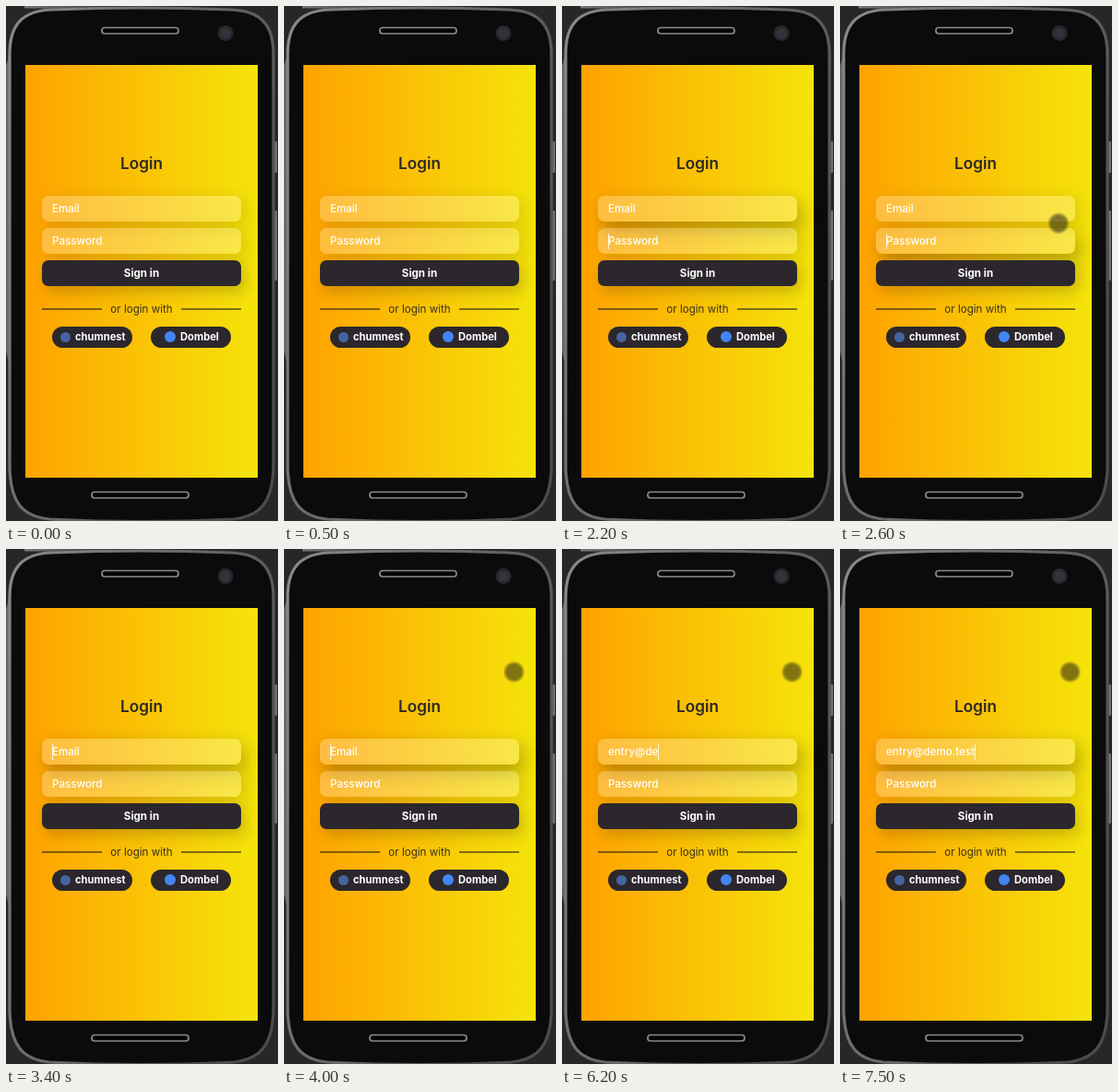
Write an HTML page that moves like this. It is 295 px wide and 559 px high and loops after 8 s.

```html
<!DOCTYPE html>
<html lang="en">
<head>
<meta charset="utf-8">
<title>Login screen</title>
<style>
  html, body { margin: 0; width: 100%; height: 100%; overflow: hidden; background: #272729; }
  #stage { position: relative; width: 295px; height: 559px; overflow: hidden;
    font: 500 11.6px/28px Inter, "Open Sans", sans-serif; color: #fff; white-space: pre; }
  #stage > * { position: absolute; }
  #phone { left: 0; top: 0; }
  #screen { left: 21px; top: 64px; width: 252px; height: 448px;
    background: linear-gradient(90deg, #ffa200, #f5e40a); }
  h1 { margin: 0; left: 21px; width: 252px; top: 157px; text-align: center;
    font-size: 17.2px; font-weight: 600; color: #2b272b; }
  .field, #submit { left: 39px; width: 216px; height: 28px; border-radius: 7px; }
  .field { box-sizing: border-box; padding-left: 11px; background: rgba(255,255,255,.25); }
  .hint { position: absolute; left: 11px; top: 0; }
  .caret { display: inline-block; width: 1px; height: 17px; background: #fffc; vertical-align: middle; }
  #email { top: 206px; }
  #password { top: 241px; }
  #submit { top: 275.5px; background: #2b272d; text-align: center; font-weight: 700;
    box-shadow: 4px 6px 16px rgba(0,0,0,.2); }
  #divider { left: 39px; width: 216px; top: 315px; text-align: center; color: #3b3019; font-weight: 400; }
  #divider::before, #divider::after { content: ""; position: absolute; top: 13px; width: 65px; height: 2px;
    background: rgba(50,40,20,.6); }
  #divider::before { left: 0; }
  #divider::after { right: 0; }
  .social { top: 348px; width: 87px; height: 23px; border-radius: 12px; background: #2b272d;
    line-height: 23px; font-weight: 700; font-size: 11.2px; }
  .social i { position: absolute; border-radius: 50%; }
  .social span { position: absolute; }
  #pointer { left: -12px; top: -12px; width: 24px; height: 24px;
    background: radial-gradient(closest-side, rgba(45,40,20,.58) 66%, rgba(45,40,20,.36) 82%, transparent); }
</style>
</head>
<body>
<div id="stage">
  <svg id="phone" width="295" height="559">
    <defs>
      <linearGradient id="rim" x2="1" y2=".6">
        <stop offset="0" stop-color="#8a8a8c"/>
        <stop offset=".5" stop-color="#6a6a6c"/>
        <stop offset="1" stop-color="#4c4c4e"/>
      </linearGradient>
      <linearGradient id="glint">
        <stop offset="0" stop-color="#77777a"/>
        <stop offset="1" stop-color="#77777a" stop-opacity="0"/>
      </linearGradient>
    </defs>
    <rect x="20" width="110" height="2.5" fill="url(#glint)"/>
    <path d="M0 65V375L5 395V48Z" fill="#66666a"/>
    <g fill="#707072">
      <rect x="289" y="147" width="5" height="34" rx="1"/>
      <rect x="289" y="222" width="5" height="76" rx="1"/>
    </g>
    <path d="M4 52C4 20 18 5 50 4Q147 0 243 4C276 5 290 20 290 52V502C289 539 275 554 247 557Q147 562 47 557C18 554 5 539 4 502Z"
      fill="#0b0b0c" stroke="url(#rim)" stroke-width="3.2"/>
    <g fill="#050505" stroke="#8a8a8c" stroke-width="1.7">
      <rect x="104" y="23.5" width="83" height="6.5" rx="3"/>
      <rect x="93" y="527.5" width="105" height="6.5" rx="3"/>
    </g>
    <circle cx="238" cy="29.5" r="8.5" fill="#29292d"/>
    <circle cx="238" cy="29.5" r="5.5" fill="#33333b"/>
  </svg>
  <div id="screen"></div>
  <h1>Login</h1>
  <div class="field" id="email"><span class="hint">Email</span><span class="value"></span><span class="caret"></span></div>
  <div class="field" id="password"><span class="hint">Password</span><span class="value"></span><span class="caret"></span></div>
  <div id="submit">Sign in</div>
  <div id="divider">or login with</div>
  <div class="social" style="left:50px"><i style="left:9px;top:6px;width:11px;height:11px;background:#4564a0"></i><span style="left:25px">chumnest</span></div>
  <div class="social" style="left:157px"><i style="left:15px;top:5px;width:12px;height:12px;background:#4285f4"></i><span style="left:32px">Dombel</span></div>
  <div id="pointer"></div>
</div>
<script>
const LOOP = 8000, BLINK = 450, FOCUS_TIME = 400, POINTER_FADE = 100;
const EMAIL_TAP = 1200, PASSWORD_TAP = 2200, RETURN_TAP = 3100;

// Text is typed in bursts, each with a steady pace.
const BURSTS = [
  { text: "entry", start: 4400, pace: 170 },
  { text: "@", start: 5500, pace: 0 },
  { text: "demo.test", start: 5900, pace: 200 }
];

// The pointer slides between two points, then rests until it hides.
const REST = { x: 249.5, y: 133.5 };
const VISITS = [
  { show: 1300, arrive: 1700, hide: 2000, from: { x: 242.5, y: 257 }, to: { x: 234.5, y: 261.5 } },
  { show: 2400, arrive: 2800, hide: 2800, from: { x: 235, y: 262 }, to: { x: 239, y: 210 } },
  { show: 3500, arrive: 3700, hide: 5700, from: { x: 243, y: 221 }, to: REST },
  { show: 6000, arrive: 6000, hide: LOOP + POINTER_FADE, from: REST, to: REST }
];

const clamp = v => Math.min(1, Math.max(0, v));
const mix = (a, b, k) => a + (b - a) * k;
const progress = (t, start, length) => length ? clamp((t - start) / length) : +(t >= start);
const ease = k => k * k * (3 - 2 * k);
const pointer = document.getElementById("pointer");

function typedText(t) {
  return BURSTS.map(({ text, start, pace }) =>
    t < start ? "" : text.slice(0, pace ? 1 + Math.floor((t - start) / pace) : text.length)).join("");
}

function drawField(id, text, focusSpans, t) {
  const field = document.getElementById(id);
  const part = name => field.querySelector(name);
  const active = focusSpans.find(([from, to]) => t >= from && t < to);
  const focus = focusSpans.reduce((sum, [from, to]) =>
    sum + ease(progress(t, from, FOCUS_TIME)) - ease(progress(t, to, FOCUS_TIME)), 0);
  const caretOn = active && (text || Math.floor((t - active[0]) / BLINK) % 2 === 0);
  part(".hint").style.visibility = text ? "hidden" : "visible";
  part(".value").textContent = text;
  part(".caret").style.visibility = caretOn ? "visible" : "hidden";
  field.style.boxShadow = `5px ${mix(5, 8, focus)}px 20px rgba(0,0,0,${mix(.12, .28, focus)})`;
}

function drawPointer(t) {
  const visit = VISITS.find(v => t < v.hide);
  const { show, arrive, hide, from, to } = visit;
  const k = progress(t, show, arrive - show);
  pointer.style.transform = `translate(${mix(from.x, to.x, k)}px, ${mix(from.y, to.y, k)}px)`;
  pointer.style.opacity = clamp(Math.min(t - show + POINTER_FADE, hide - t) / POINTER_FADE);
}

function draw(now) {
  const t = now % LOOP;
  drawField("email", typedText(t), [[EMAIL_TAP, PASSWORD_TAP], [RETURN_TAP, LOOP]], t);
  drawField("password", "", [[PASSWORD_TAP, RETURN_TAP]], t);
  drawPointer(t);
}

const start = performance.now();
function tick() {
  draw(performance.now() - start);
  requestAnimationFrame(tick);
}
tick();
</script>
</body>
</html>
```
